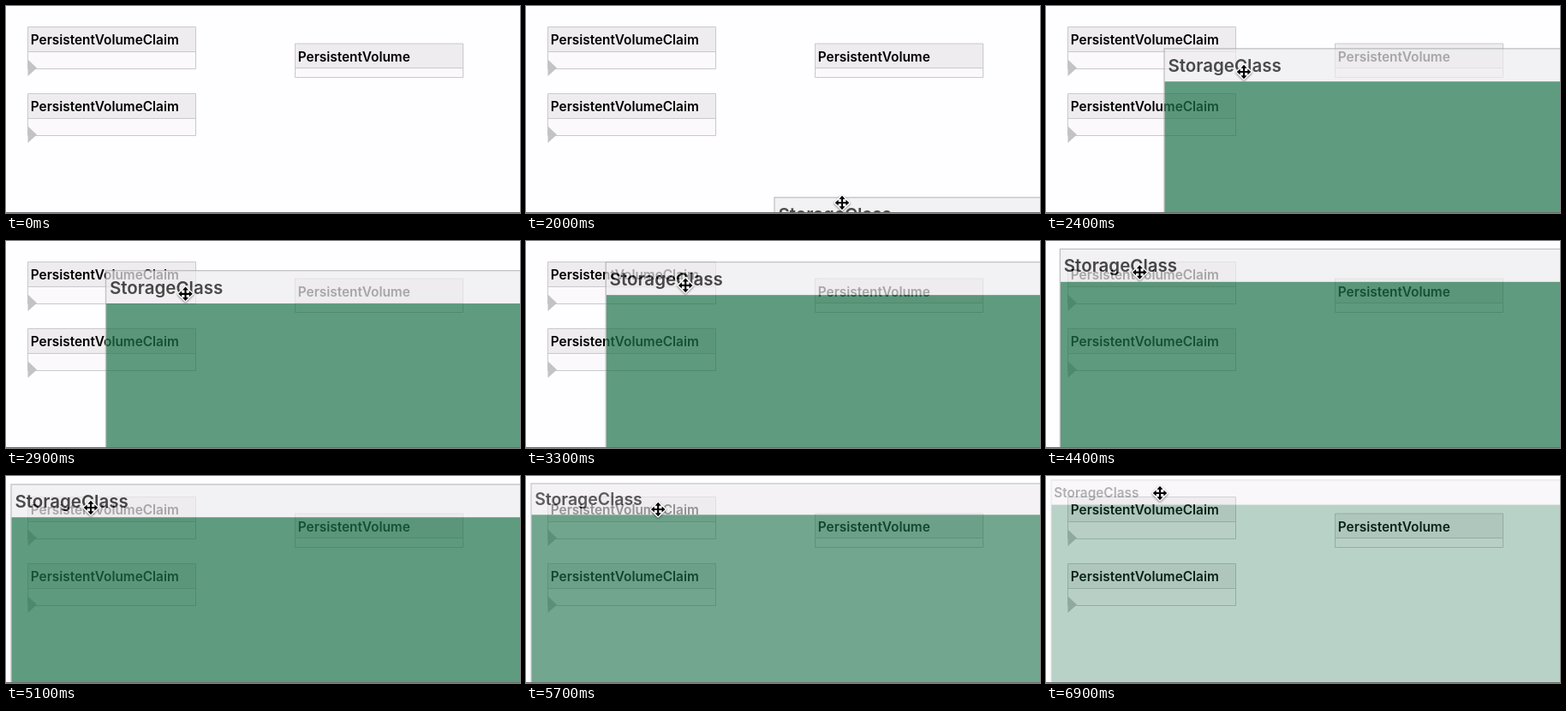
These frames come from a looping animation (600x242 px, 7000 ms). An HTML page:

```html
<!DOCTYPE html>
<html lang="en">
<head>
<meta charset="utf-8">
<title>StorageClass drag</title>
<style>
  html, body { margin: 0; height: 100%; overflow: hidden; background: #fefdff; }
  svg { display: block; width: 600px; height: 242px; }
  text { font: 600 15.36px Inter, sans-serif; }
  .body { fill: #fbf9fc; }
  .head { fill: #eeecee; }
  .line { fill: none; stroke: #c9c8ca; }
</style>
</head>
<body>
<svg viewBox="0 0 600 242">
  <defs>
    <g id="claim">
      <rect class="body" width="196" height="49"/>
      <rect class="head" width="196" height="29"/>
      <path class="line" d="M0 0H196V49H0ZM0 29H196"/>
      <path d="M0 38L10.5 48 0 57.5Z" fill="#c3c2c4"/>
      <text x="3.3" y="20.7">PersistentVolumeClaim</text>
    </g>
  </defs>
  <use href="#claim" x="25.5" y="24.5"/>
  <use href="#claim" x="25.5" y="102.5"/>
  <g transform="translate(337.5 44)">
    <rect class="body" width="196" height="39.5"/>
    <rect class="head" width="196" height="28.5"/>
    <path class="line" d="M0 0H196V39.5H0ZM0 28.5H196"/>
    <text x="3.3" y="20.7">PersistentVolume</text>
  </g>
  <g id="card">
    <rect width="900" height="400" fill="#1d724a"/>
    <rect class="head" width="900" height="28.8"/>
    <path class="line" d="M900 0H0V400" style="stroke:#aaa"/>
    <text x="3.3" y="20.2">StorageClass</text>
  </g>
  <rect y="241" width="600" height="1" fill="#6c6c6c"/>
  <g id="cursor" stroke-linejoin="round">
    <path d="M0-8L8 0 0 8-8 0Z" fill="#fff" stroke="#fff" stroke-width="3"
      style="filter:drop-shadow(0 1px 1px #0007)"/>
    <path d="M0-8.3L3.6-4.3H1.1V-1.1H4.3V-3.6L8.3 0 4.3 3.6V1.1H1.1V4.3H3.6L0 8.3-3.6 4.3H-1.1V1.1H-4.3V3.6L-8.3 0-4.3-3.6V-1.1H-1.1V-4.3H-3.6Z"/>
  </g>
</svg>
<script>
const LOOP = 7000, STEP = 100, START = 2000;
const card = document.getElementById('card');
const cursor = document.getElementById('cursor');

const mix = (a, b, u) => a + (b - a) * u;
const ramp = (t, from, to) => Math.min(1, Math.max(0, (t - from) / (to - from)));

function draw(now) {
  const t = Math.floor(now % LOOP / STEP) * STEP;
  const shown = t >= START ? 'visible' : 'hidden';

  // The card swoops in, drifts to the corner, settles, then drops.
  const lag = (1 - ramp(t, START, 2400)) ** 2;
  const drift = ramp(t, 2400, 4600);
  const settle = ramp(t, 4800, 5100);
  const drop = ramp(t, 5600, 6100);
  const x = 138 + 152 * lag - 137 * drift ** 1.25 + 5 * settle;
  const y = 9 + 174 * lag + 41 * (1 - drift) ** 1.8 + settle - 5 * drop;

  // The pointer holds the card, wanders off after the drop and comes back.
  const back = ramp(t, 6400, 6900);
  const cx = mix(mix(x + 93 - 14 * lag, 375, drop), 133, back);
  const cy = mix(mix(y + 27 - 21 * lag, 51, drop), 20, back);

  card.setAttribute('transform', `translate(${x} ${y - .2}) scale(${mix(1.335, 1, drop)})`);
  card.setAttribute('opacity', mix(.7, .3, drop));
  cursor.setAttribute('transform', `translate(${cx} ${cy})`);
  card.setAttribute('visibility', shown);
  cursor.setAttribute('visibility', shown);
}

const origin = performance.now();
function frame() {
  draw(performance.now() - origin);
  requestAnimationFrame(frame);
}
frame();
</script>
</body>
</html>
```
